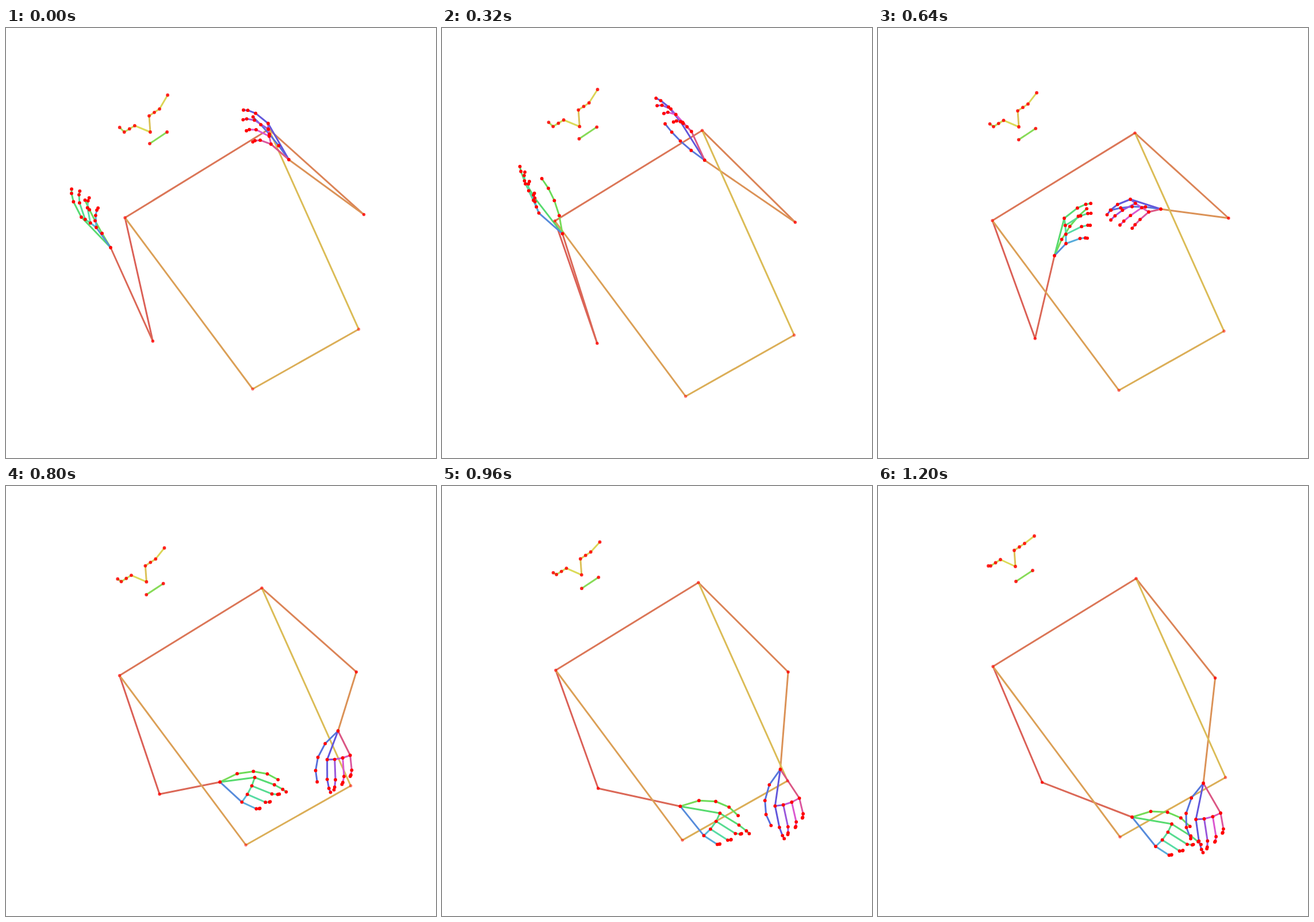
Recreate the animation shown at these times as an HTML page. Size 748 by 748 pixels, loop 1280 ms.

```html
<!DOCTYPE html>
<html lang="en">
<head>
<meta charset="utf-8">
<title>Skeleton in motion</title>
<style>
html, body { margin: 0; width: 100%; height: 100%; overflow: hidden; background: #fff; }
svg { display: block; width: 100%; height: 100%; }
line { stroke-width: 3; }
circle { fill: #f00; }
</style>
</head>
<body>
<svg id="stage" viewBox="0 0 748 748"></svg>
<script>
const LOOP = 1280, STEP = 80;

// Hand shapes: open, raised, crossing, lowered.
// thumb: length, angle, curl; index and little finger:
// knuckle x, y from the wrist, length, angle, curl, taper
const hand = (thumb, index, little) => [...thumb, ...index, ...little];
const shapesA = [
  hand([29, 239, 2], [-51, -53, 30, 243, 14, .5], [-25, -35, 21, 267, 16, .45]),
  hand([32, 260, -8], [-48, -62, 35, 239, 10, .5], [-41, -36, 24, 247, 24, .38]),
  hand([31, 294, 8], [17, -65, 29, 322, 14, .55], [20, -21, 26, 340, 14, .36]),
  hand([34, 343, 20], [69, 12, 39, 392, 6, .42], [41, 51, 28, 393, -40, .14])
];
const shapesB = [
  hand([30, 234, -3], [-36, -63, 28, 219, -18, .52], [-31, -27, 20, 200, -25, .46]),
  hand([29, 216, 5], [-42, -67, 33, 231, -12, .53], [-23, -50, 22, 226, -33, .5]),
  hand([27, 188, -7], [-53, -17, 24, 158, -16, .65], [-21, 5, 20, 139, -5, .63]),
  hand([33, 129, -20], [-13, 63, 38, 82, -9, .4], [30, 52, 28, 80, 20, .22])
];

const keys = [];
function pose(time, shape, body, head, wrists, turn = 0) {
  keys.push({ time, v: [...body, ...head, ...wrists, turn, ...shapesA[shape], ...shapesB[shape]] });
}
// body: shoulder x, y, size, upper arm angles; head: nose offset, nod
pose(0, 0, [207, 330, 1.005, 77.3, 41.9], [44, -149, 0], [182, 382, 492, 229]);
pose(160, 1, [203, 333, 1.013, 75.2, 42.2], [44, -155, 0], [195, 371, 466, 224]);
pose(480, 1, [192, 337, 1.04, 68, 46.8], [42, -170, .3], [231, 350, 453, 245]);
pose(640, 2, [199, 335, .996, 70.1, 42.3], [46, -163, .4], [307, 396, 492, 315]);
pose(880, 3, [197, 326, .994, 71.6, 41.5], [47, -163, .45], [397, 552, 600, 469], -7);
pose(1040, 3, [199, 316, 1, 68.4, 49.2], [42, -170, .8], [427, 561, 574, 507]);
pose(1200, 3, [200, 314, 1, 67, 51.5], [39, -174, 1], [442, 576, 566, 517]);

const mix = (a, b, u) => a + (b - a) * u;
const step = ([x, y], length, angle) => {
  const r = angle * Math.PI / 180;
  return [x + length * Math.cos(r), y + length * Math.sin(r)];
};
const middle = (p, q) => [mix(p[0], q[0], .5), mix(p[1], q[1], .5)];

function chain(start, count, length, angle, curl, taper) {
  const joints = [start];
  for (let i = 0; i < count; i++) {
    joints.push(step(joints[i], length * taper ** i, angle + curl * i));
  }
  return joints;
}

// Wrist, thumb, then four fingers blended from index to little
function handJoints(wrist, shape, turn) {
  const [length, angle, curl] = shape;
  const joints = chain(wrist, 4, length, angle + turn, curl, .86);
  for (let f = 0; f < 4; f++) {
    const u = f / 3, bump = 4 * u * (1 - u), late = 1 - (1 - u) ** 3;
    const at = (i, w = u) => mix(shape[3 + i], shape[9 + i], w);
    const reach = Math.hypot(at(0), at(1)) * (1 + .05 * bump);
    const aim = Math.atan2(at(1), at(0)) * 180 / Math.PI;
    const knuckle = step(wrist, reach, aim + turn);
    joints.push(...chain(knuckle, 3, at(2) * (1 + .14 * bump), at(3) + turn, at(4, late), at(5, late)));
  }
  return joints;
}

// Nose, two eyes with ears, mouth; the last two arguments follow the nod
function faceJoints([x, y], size, nod) {
  const at = (dx, dy, nx = 0, ny = 0) => [x + size * (dx + nod * nx), y + size * (dy + nod * ny)];
  const eyeA = at(-2, -28), cornerA = at(16, -40), eyeB = at(-27, -11, 1, -1), cornerB = at(-45, 0, 2, -1);
  return [
    [x, y],
    eyeA, middle(eyeA, cornerA), cornerA, at(30, -64, 3, 11),
    eyeB, middle(eyeB, cornerB), cornerB, at(-53, -8, 6, 7),
    at(29, 0, 1, 7), at(-1, 20, 2, 6)
  ];
}

function skeleton(v) {
  const [x, y, size, armA, armB, headX, headY, nod, ax, ay, bx, by, turn] = v;
  const at = (dx, dy) => [x + dx * size, y + dy * size];
  const shoulder = at(249, -153);
  return [
    [x, y], shoulder,
    step([x, y], 219 * size, armA), step(shoulder, 221 * size, armB),
    at(221, 296.5), at(404.5, 193),
    ...faceJoints([x + headX, y + headY], size, nod),
    ...handJoints([ax, ay], v.slice(13, 28), 0),
    ...handJoints([bx, by], v.slice(28), turn)
  ];
}

const FACE = 6, HAND_A = 17, HAND_B = 38;
const edges = [];
function path(joints, hue, gap) {
  for (let i = 1; i < joints.length; i++) {
    edges.push([joints[i - 1], joints[i], hue + gap * (i - 1)]);
  }
}
path([0, 2, HAND_A], 4, 4);
path([0, 1, 3, HAND_B], 14, 6.5);
path([0, 4, 5, 1], 33, 6.5);
path([6, 7, 8, 9, 10], 48, 3);
path([6, 11, 12, 13, 14], 60, 8);
path([15, 16], 98, 0);

// Hues of the fingers, of the links to their knuckles, and of the outer palm
function addHand(root, fingers, links, palm) {
  fingers.forEach((hue, f) => {
    const base = root + 1 + 4 * f;
    path([f < 2 ? root : base - 4, base], links[f], 0);
    path([base, base + 1, base + 2, base + 3], hue, 1);
  });
  path([root, root + 17], palm, 0);
}
addHand(HAND_A, [110, 133, 146, 155, 202], [106, 131, 140, 150, 196], 216);
addHand(HAND_B, [228, 245, 270, 305, 327], [225, 245, 260, 288, 318], 339);

const svg = document.getElementById("stage");
function set(el, attrs) {
  for (const name in attrs) el.setAttribute(name, attrs[name]);
}
function add(tag, attrs) {
  const el = document.createElementNS("http://www.w3.org/2000/svg", tag);
  set(el, attrs);
  svg.append(el);
  return el;
}

const lines = edges.map(e => add("line", { stroke: `hsl(${e[2]} 65% 60%)` }));
const dots = skeleton(keys[0].v).map((_, i) => add("circle", {
  r: i < FACE ? 2.7 : 2.9,
  "fill-opacity": i < 2 ? .65 : i < 4 ? .8 : i < FACE ? .5 : i < HAND_A ? .85 : 1
}));

function slope(k, c) {
  const a = keys[k], b = keys[k + 1];
  return (b.v[c] - a.v[c]) / (b.time - a.time);
}

// Speed at a key, damped so that the curve does not overshoot
function speed(k, c) {
  if (k === 0) return slope(0, c);
  if (k === keys.length - 1) return slope(k - 1, c);
  const p = slope(k - 1, c), q = slope(k, c);
  return p * q > 0 ? 2 * p * q / (p + q) : 0;
}

function valuesAt(time) {
  let k = 0;
  while (k < keys.length - 2 && time >= keys[k + 1].time) k++;
  const a = keys[k], b = keys[k + 1], span = b.time - a.time;
  const u = (time - a.time) / span, w = 1 - u;
  return a.v.map((start, c) =>
    start * w * w * (1 + 2 * u) + b.v[c] * u * u * (1 + 2 * w)
    + span * u * w * (w * speed(k, c) - u * speed(k + 1, c)));
}

function draw(now) {
  const pts = skeleton(valuesAt(Math.floor(now % LOOP / STEP) * STEP));
  edges.forEach(([a, b], i) => set(lines[i], {
    x1: pts[a][0], y1: pts[a][1], x2: pts[b][0], y2: pts[b][1]
  }));
  dots.forEach((dot, i) => set(dot, { cx: pts[i][0], cy: pts[i][1] }));
}

let start;
function tick(now) {
  start ??= now;
  draw(now - start);
  requestAnimationFrame(tick);
}
draw(0);
requestAnimationFrame(tick);
</script>
</body>
</html>
```
